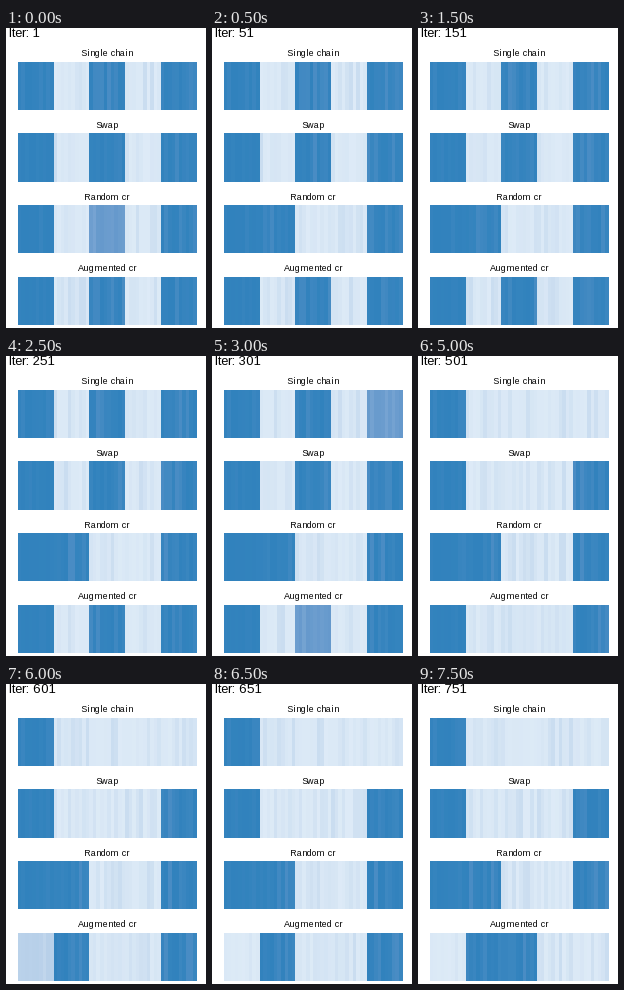
Recreate the animation shown at these times as a matplotlib script. Size 200 by 300 pixels, loop 8000 ms.

```python
import numpy as np
import matplotlib.pyplot as plt
from matplotlib.animation import FuncAnimation
from matplotlib.colors import LinearSegmentedColormap

W, H, DPI = 200, 300, 100
STEPS, CELLS, BLOCK = 16, 50, 10
LEFT, RIGHT = 11.8, 190.6
TOP, PITCH, HEIGHT = 33.75, 71.6, 48.3

# Whole-pixel glyph advances
plt.rcParams.update({"font.family": "Liberation Sans",
                     "text.hinting_factor": 1})

# Block levels: dark, medium, pale, light
LEVEL = {"D": 0.0, "M": 0.3, "C": 0.76, "L": 0.99}
SPREAD = {"D": 0.045, "M": 0.03, "C": 0.05, "L": 0.038}
CMAP = LinearSegmentedColormap.from_list("blues", [
    (0.0, "#3182bd"), (0.3, "#6699cc"), (0.73, "#b2cce7"), (1.0, "#deebf7")])

# Title and the block pattern from each step on
PANELS = [
    ("Single chain", {0: "DLDLD", 6: "DLDLM", 7: "DLDLL",
                      8: "DLCLL", 9: "DLLLL"}),
    ("Swap", {0: "DLDLD", 7: "DLMLD", 8: "DLLLD"}),
    ("Random cr", {0: "DLMLD", 1: "DDLLD"}),
    ("Augmented cr", {0: "DLDLD", 6: "DLMLD", 7: "DLLLD", 11: "DMLLD",
                      12: "CDLLD", 13: "LDLLD", 14: "LDDLL"}),
]

# Range of stripes that may change at each step
ACTIVE = [(4, 48), (4, 50), (2, 50), (5, 50), (7, 46), (5, 50), (7, 50),
          (5, 50), (1, 49), (1, 50), (1, 48), (0, 50), (0, 49), (5, 50),
          (7, 50)]


def draw_noise(rng):
    return np.minimum(rng.exponential(1, CELLS), 3)


def stripe_values(rng, patterns):
    """Level of every stripe at every step."""
    noise = draw_noise(rng)
    chance = np.full(CELLS, 0.4)
    chance[:BLOCK] = 0.12
    rows, pattern = [], None
    for step in range(STEPS):
        pattern = patterns.get(step, pattern)
        if step:
            lo, hi = ACTIVE[step - 1]
            change = rng.random(CELLS) < chance
            change[:lo] = change[hi:] = False
            noise = np.where(change, draw_noise(rng), noise)
        base = np.repeat([LEVEL[c] for c in pattern], BLOCK)
        spread = np.repeat([SPREAD[c] for c in pattern], BLOCK)
        spread[:BLOCK] *= 0.4
        sign = np.where(base > 0.9, -1, 1)
        rows.append(base + sign * spread * noise)
    return np.array(rows)


def px(size):
    return size * 72 / DPI


fig = plt.figure(figsize=(W / DPI, H / DPI), dpi=DPI, facecolor="white")
ax = fig.add_axes([0, 0, 1, 1])

rng = np.random.default_rng(12)
edges = np.round(np.linspace(LEFT, RIGHT, CELLS + 1))
bars = []
for i, (title, patterns) in enumerate(PANELS):
    values = stripe_values(rng, patterns)
    top = TOP + PITCH * i
    mesh = ax.pcolormesh(edges, np.round([top, top + HEIGHT]), values[:1],
                         cmap=CMAP, vmin=0, vmax=1, antialiased=False,
                         linewidth=0)
    bars.append((mesh, values))
    ax.text((LEFT + RIGHT) / 2, round(top - 5.3), title, ha="center",
            va="baseline", size=px(9), color="black")

ax.set(xlim=(0, W), ylim=(H, 0))
ax.axis("off")
counter = ax.text(3, 9, "", va="baseline", size=px(13), color="black")


def update(step):
    counter.set_text(f"Iter: {1 + 50 * step}")
    for mesh, values in bars:
        mesh.set_array(values[step:step + 1])
    return [counter] + [mesh for mesh, _ in bars]


anim = FuncAnimation(fig, update, frames=STEPS, interval=500, repeat=True,
                     repeat_delay=0)
plt.show()
```
